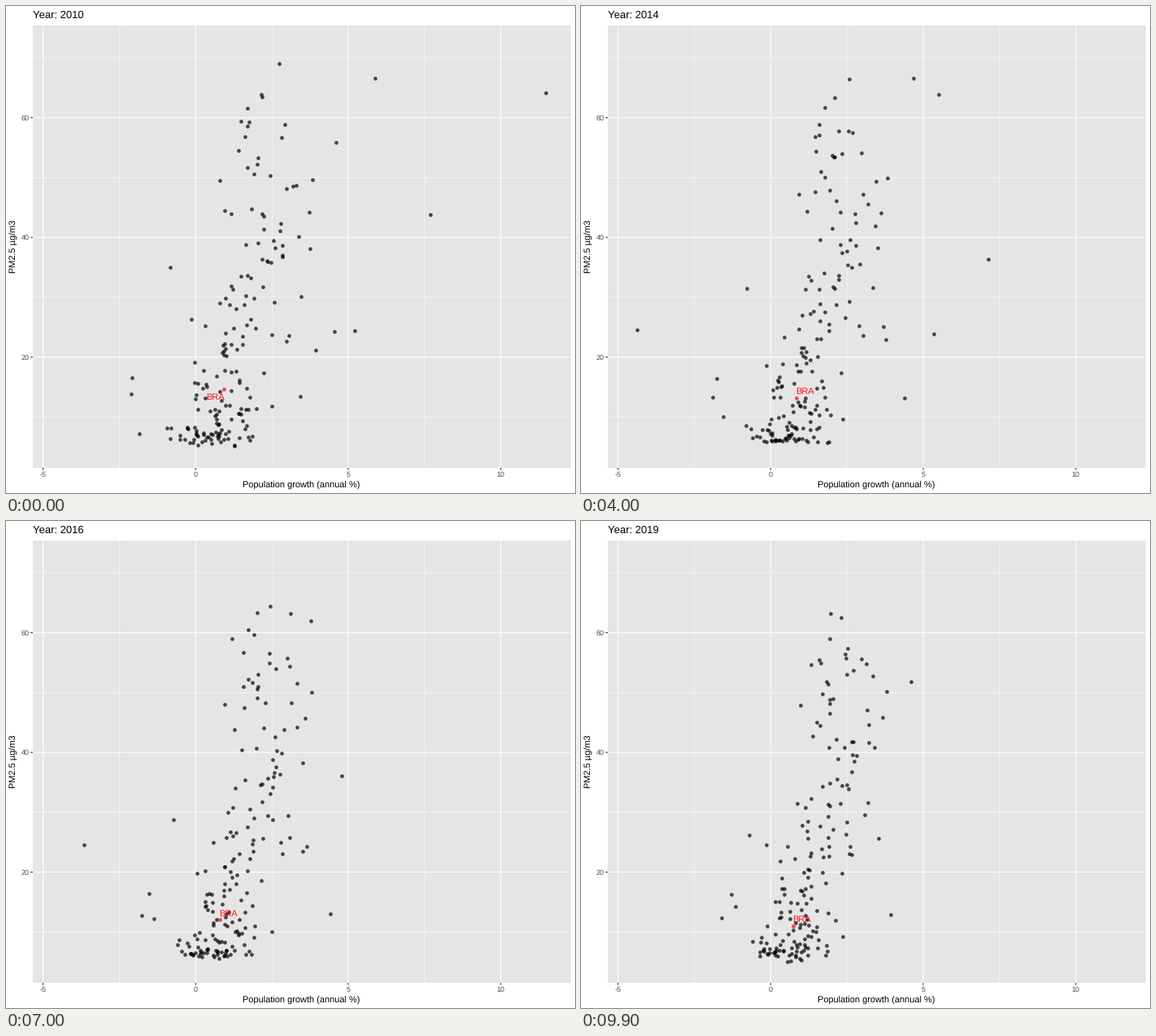
These frames come from a looping animation (700 px wide and 600 px high, 10000 ms). A matplotlib script:

```python
import numpy as np
import matplotlib.pyplot as plt
from matplotlib.animation import FuncAnimation

W, H, DPI = 700, 600, 100
YEARS, STEPS = 10, 11            # eleven frames per year
FRAMES = (YEARS - 1) * STEPS + 1
LAST = FRAMES - 1
PX = 72 / DPI                    # points per pixel
LEFT, RIGHT, TOP, BOTTOM = 33, 694.5, 23.5, 569

plt.rcParams["font.family"] = ["Liberation Sans", "DejaVu Sans"]
plt.rcParams["text.hinting"] = "none"
plt.rcParams["text.hinting_factor"] = 1

# Isolated countries that glide evenly: start x, y and end x, y in pixels
GLIDES = np.array([
    [377, 214, 376, 210], [404, 401, 326, 386], [381, 424, 366, 391],
    [155, 458, 185, 460], [154, 478, 173, 489], [164, 527, 190, 475],
    [202, 322, 207, 387], [336, 71, 320, 119], [315, 112, 307, 114],
], float)


def crowd(n=168, seed=5):
    """Yearly places of the bulk: dense at the bottom, leaning right higher up."""
    rng = np.random.default_rng(seed)
    rise = 400 * ((np.arange(n) + 0.5) / n) ** 2.45
    centre = 259 + 58 * np.clip(rise / 230, 0, 1)
    spread = rng.normal(0, 27, n).clip(-58, 58)
    squeeze = np.linspace(1.06, 0.94, YEARS)
    x = centre[:, None] + spread[:, None] * squeeze
    y = np.repeat(535 - rise[:, None], YEARS, axis=1)

    walk = rng.normal(0, 1, (2, n, YEARS)).cumsum(axis=2)
    walk -= walk.mean(axis=2, keepdims=True)
    x += 3 * walk[0]
    y += (2.5 + 0.025 * rise[:, None]) * walk[1]
    return np.stack([x, y.clip(60, 543)], axis=2)


def travellers(f):
    """The few countries whose growth swings widely."""
    t = f / LAST
    ease = (1 - np.cos(np.pi * t)) / 2
    arch = np.sin(np.pi * t)
    surge = np.exp(-((f - 28) / 12) ** 2)
    return [
        (320 + 344 * np.exp(-f / 38), 107 + 63 * t ** 4),
        (454 - 129 * ease, 89 + 75 * ease ** 5),
        (522 - 169 * ease ** 2, 312 - 55 * np.exp(-f / 8) + 35 * t ** 9),
        (228 - 166 * arch, 399 - 13 * np.exp(-f / 8)),
        (429 - 99 * ease ** 2 + 48 * surge, 400 + 10 * t),
        (406 - 75 * arch, 168 + 30 * t - 25 * arch),
        (362 + 19 * t + 30 * arch, 481 + 4 * t),
    ]


CROWD = crowd()


def places(f):
    year = min(f // STEPS, YEARS - 2)
    u = f / STEPS - year
    bulk = CROWD[:, year] * (1 - u) + CROWD[:, year + 1] * u
    t = f / LAST
    glides = GLIDES[:, :2] * (1 - t) + GLIDES[:, 2:] * t
    return np.vstack([bulk, glides, travellers(f)])


def px_x(v):
    return 233.3 + 37.54 * v


def px_y(v):
    return 432.6 - 7.375 * (v - 20)


fig = plt.figure(figsize=(W / DPI, H / DPI), dpi=DPI, facecolor="white")
ax = fig.add_axes([0, 0, 1, 1])
ax.set_xlim(0, W)
ax.set_ylim(H, 0)
ax.axis("off")


def label(x, y, s, size, color="black", **kw):
    kw = {"ha": "center", "va": "center_baseline", **kw}
    return ax.text(x, y, s, fontsize=size * PX, color=color, **kw)


def line(xs, ys, color, width, z):
    ax.plot(xs, ys, color=color, lw=width * PX, zorder=z,
            solid_capstyle="butt", snap=False)


ax.add_patch(plt.Rectangle((LEFT, TOP), RIGHT - LEFT, BOTTOM - TOP,
                           fc="#e5e5e5", ec="none", zorder=0))
for v in (-2.5, 2.5, 7.5):
    line([px_x(v)] * 2, [TOP, BOTTOM], "white", 0.53, 1)
for v in (10, 30, 50, 70):
    line([LEFT, RIGHT], [px_y(v)] * 2, "white", 0.53, 1)
for v in (-5, 0, 5, 10):
    x = px_x(v)
    line([x, x], [TOP, BOTTOM], "white", 1.07, 2)
    line([x, x], [BOTTOM, BOTTOM + 2.7], "#333333", 1.07, 2)
    label(x, 577, str(v), 8.8, "#4d4d4d")
for v in (20, 40, 60):
    y = px_y(v)
    line([LEFT, RIGHT], [y, y], "white", 1.07, 2)
    line([LEFT - 2.7, LEFT], [y, y], "#333333", 1.07, 2)
    label(28.3, y, str(v), 8.8, "#4d4d4d", ha="right")

label(363.7, 589.5, "Population growth (annual %)", 11)
label(10, 296.5, "PM2.5 µg/m3", 11, rotation=90, va="center")
title = label(33, 10.5, "", 13.2, ha="left")

dot = dict(s=(4.7 * PX) ** 2, alpha=0.7, linewidths=0)
dots = ax.scatter([], [], color="black", zorder=3, **dot)
mark = ax.scatter([], [], color="red", zorder=4, **dot)
tag = label(0, 0, "BRA", 11.4, "red", zorder=5, alpha=0.9)


def draw(f):
    dots.set_offsets(places(f))
    t = f / LAST
    x, y = 268 - 7 * t, 472 + 27 * t
    mark.set_offsets([(x, y)])
    # the tag hops between the two sides of its dot
    above = 1 <= f % 13 <= 8
    dx, dy = (10.5, -8.5) if above else (-10.5, 9.5)
    tag.set_position((x + dx, y + dy))
    title.set_text(f"Year: {2010 + round(f / STEPS)}")
    return dots, mark, tag, title


anim = FuncAnimation(fig, draw, frames=FRAMES, interval=100, repeat=True)
plt.show()
```
